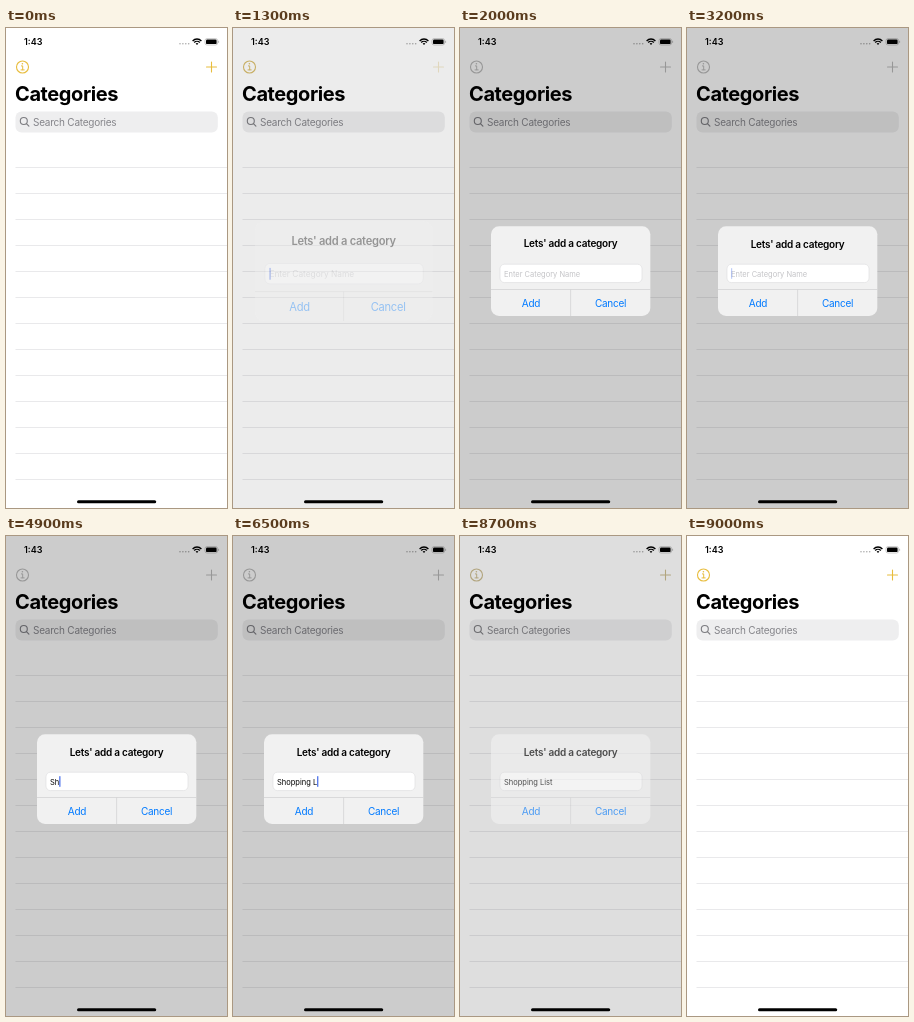
These frames come from a looping animation (221 by 480 pixels, 9.1 s). An HTML page:

```html
<!DOCTYPE html>
<html lang="en">
<head>
<meta charset="utf-8">
<title>Add a category</title>
<style>
  html, body { margin: 0; width: 100%; height: 100%; overflow: hidden; background: #fff; }
  svg { display: block; width: 221px; height: 480px; font: 10px Inter, sans-serif; letter-spacing: -.24px; }
  .mid { text-anchor: middle; }
  .small { font-size: 7.5px; letter-spacing: 0; white-space: pre; }
  .line { fill: none; stroke-linecap: round; }
</style>
</head>
<body>
<svg viewBox="0 0 221 480">
  <!-- status bar -->
  <text x="18" y="17" font-size="9" font-weight="600" letter-spacing="0">1:43</text>
  <path d="M174 15.8h10" class="line" stroke="#aaa" stroke-width="1.6" stroke-dasharray="0 2.9"/>
  <g fill="none" stroke="#000" stroke-width="1.4">
    <path d="M186.6 12.9a6.2 6.2 0 0 1 8.8 0M188.2 14.5a4 4 0 0 1 5.6 0"/>
    <path d="M191 17l-1.4-1.4a2 2 0 0 1 2.8 0z" fill="#000" stroke="none"/>
  </g>
  <rect x="199" y="10.6" width="12.6" height="6.4" rx="2" fill="none" stroke="#aaa" stroke-width=".6"/>
  <rect x="200" y="11.5" width="10.6" height="4.6" rx="1.2"/>
  <path d="M212.6 12.8v2" stroke="#aaa" stroke-width=".8"/>

  <!-- navigation and list -->
  <g id="tint" class="line" stroke="#e8bd3e">
    <circle cx="16.5" cy="39" r="6" stroke-width="1.1"/>
    <path d="M15.4 37.9h1.3v3.9M15 41.9h3.2" stroke-width="1"/>
    <circle cx="16.4" cy="35.8" r=".8" fill="#e8bd3e" stroke="none"/>
    <path id="plus" d="M200.5 39h10M205.5 34v10" stroke-width="1.1"/>
  </g>
  <text x="9" y="73" font-size="20" font-weight="700" letter-spacing="-.4">Categories</text>
  <rect x="9.5" y="83.5" width="202.3" height="21" rx="6" fill="#eeeeef"/>
  <g class="line" stroke="#7c7c80" stroke-width="1.1">
    <circle cx="17.8" cy="93" r="3.5"/><path d="M20.4 95.7l2.5 2.5"/>
  </g>
  <text x="27" y="97.6" fill="#85858a">Search Categories</text>
  <path id="rows" stroke="#e4e4e6" stroke-width=".8"/>
  <rect id="dim" width="221" height="480"/>
  <rect x="71" y="472.2" width="79.2" height="3" rx="1.5"/>

  <!-- dialog -->
  <clipPath id="round"><rect x="31" y="198.3" width="159.3" height="89.6" rx="8"/></clipPath>
  <g id="card">
    <g clip-path="url(#round)">
      <path d="M31 198h160v90H31z" fill="#f1f1f1"/>
      <path id="press" d="M31 261.5h79.5V288H31z" fill="#dadada"/>
      <path d="M31 261.5h160M110.6 261.5V288" stroke="#d0d0d2" stroke-width=".7"/>
    </g>
    <text class="mid" x="110.6" y="219.5" font-weight="600">Lets' add a category</text>
    <rect x="40" y="236.2" width="142" height="18.4" rx="4.5" fill="#fff" stroke="#dcdcde" stroke-width=".6"/>
    <text id="hint" class="small" x="44" y="248.6" fill="#c4c4c7">Enter Category Name</text>
    <text id="typed" class="small" x="44" y="248.6"></text>
    <rect id="caret" y="240.2" width="1.2" height="10.6" fill="#4169ea"/>
    <g class="mid" fill="#007aff">
      <text x="71" y="278.7">Add</text><text x="150.6" y="278.7">Cancel</text>
    </g>
  </g>
</svg>
<script>
const $ = id => document.getElementById(id);
const [tint, plus, rows, dim, card, press, hint, typed, caret] =
  ['tint', 'plus', 'rows', 'dim', 'card', 'press', 'hint', 'typed', 'caret'].map($);
const LOOP = 9100, STEP = 100, LABEL = 'Shopping List';
// times at which each further letter appears
const KEYS = [4900, 4900, 5100, 5400, 5500, 5700, 5800, 6100, 6200, 6500, 6700, 6800, 6900];

let lines = '';
for (let y = 139.5; y < 460; y += 26) lines += `M9.5 ${y}H221`;
rows.setAttribute('d', lines);

const clamp = v => Math.max(0, Math.min(1, v));

function shown(t) {
  if (t < 1300) return 0;
  if (t <= 8600) return 1 - Math.exp((1250 - t) / 110);
  return clamp(1 - (t - 8600) / 400) ** 1.5;
}

function caretAlpha(t) {
  if (t >= 7500) return t < 7600 ? .4 : 0;
  if (t < 1800 || t >= 4800) return 1;
  const c = (t - 1800) % 1000;
  return c < 300 ? clamp((200 - c) / 300) : clamp((c - 300) / 300);
}

function draw(t) {
  const p = shown(t);
  const zoom = t < 8600 ? 1 + .18 * (1 - p) : 1;
  tint.style.filter = `grayscale(${p})`;
  plus.style.opacity = t < 1100 || t >= 1500 ? 1 : t < 1400 ? .35 : .6;
  dim.style.opacity = .2 * p;
  card.style.opacity = p;
  card.setAttribute('transform', `translate(110.6 243) scale(${zoom}) translate(-110.6 -243)`);
  press.style.opacity = t === 8600 ? 1 : 0;

  const text = LABEL.slice(0, KEYS.filter(k => k <= t).length);
  if (typed.textContent !== text) typed.textContent = text;
  hint.style.opacity = text ? 0 : 1;
  caret.setAttribute('x', 44 + (text ? typed.getComputedTextLength() : 0));
  caret.style.opacity = caretAlpha(t);
}

function tick() {
  draw(Math.floor(performance.now() % LOOP / STEP) * STEP);
  requestAnimationFrame(tick);
}
tick();
</script>
</body>
</html>
```
